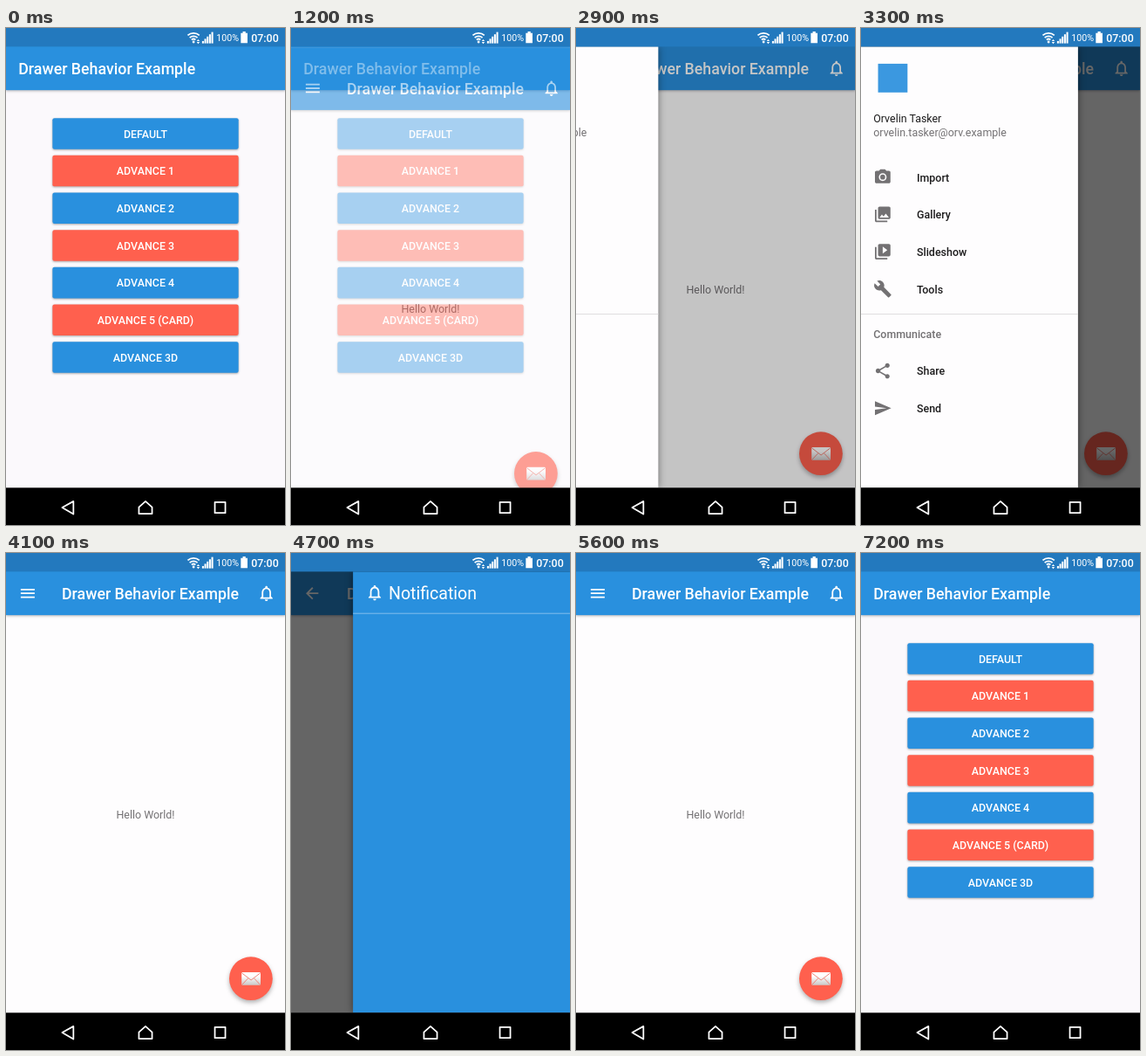
Write an HTML page that moves like this. It is 320 px wide and 569 px high and loops after 8000 ms.

```html
<!DOCTYPE html>
<html lang="en">
<head>
<meta charset="utf-8">
<title>Drawer demo</title>
<style>
  html, body { margin: 0; width: 100%; height: 100%; overflow: hidden; background: #000; }
  svg { display: block; width: 100vw; height: 100vh; }
  text { font: 14px Roboto, sans-serif; }
  .medium { font-weight: 500; }
  .title { font-size: 20px; font-weight: 500; fill: #fff; }
  .blue { fill: #2990de; }
  .red { fill: #ff604e; }
  .white { fill: #fff; }
  .grey { fill: #737173; }
  .line { fill: none; stroke: #fff; stroke-width: 2; }
  .bar { filter: drop-shadow(0 1.5px 2px rgba(0, 0, 0, .3)); }
  .button { filter: drop-shadow(0 1.3px 1.3px rgba(0, 0, 0, .35)); }
  .fab { filter: drop-shadow(0 3px 3px rgba(0, 0, 0, .3)); }
  .drawer { filter: drop-shadow(0 0 5px rgba(0, 0, 0, .45)); }
</style>
</head>
<body>
<!-- The viewBox is in dp: 360 x 640 -->
<svg viewBox="0 0 360 640" preserveAspectRatio="none">
  <defs>
    <path id="bell" d="M12 22c1.1 0 2-.9 2-2h-4c0 1.1.9 2 2 2zm6-6v-5c0-3.07-1.63-5.64-4.5-6.32V4c0-.83-.67-1.5-1.5-1.5s-1.5.67-1.5 1.5v.68C7.64 5.36 6 7.92 6 11v5l-2 2v1h16v-1l-2-2zm-2 1H8v-6c0-2.48 1.51-4.5 4-4.5s4 2.02 4 4.5v6z"/>
    <linearGradient id="paper" x2="0" y2="1">
      <stop offset=".3" stop-color="#fff"/><stop offset="1" stop-color="#c9c9c9"/>
    </linearGradient>
  </defs>

  <g id="home">
    <rect width="360" height="640" fill="#fbf9fc"/>
    <rect class="blue bar" width="360" height="80"/>
    <text class="title" x="16" y="59.5">Drawer Behavior Example</text>
    <g id="buttons"></g>
  </g>

  <g id="detail">
    <rect width="360" height="640" fill="#fefdfe"/>
    <rect class="blue bar" width="360" height="80"/>
    <path id="toggle" class="line"/>
    <text class="title" x="72" y="59.5">Drawer Behavior Example</text>
    <use href="#bell" class="white" x="324" y="40"/>
    <text x="180" y="341.5" text-anchor="middle" fill="#747274">Hello World!</text>
    <circle class="red fab" cx="316" cy="548" r="28"/>
    <rect x="304" y="540" width="24.5" height="16.5" rx="1.5" fill="url(#paper)"/>
    <path d="M304.5 541L316.2 550L328 541M304.5 556L312.5 547.5M328 556L320 547.5" fill="none" stroke="#f08377" stroke-width="1.1"/>

    <rect id="scrim" width="360" height="640"/>

    <g id="left">
      <rect class="drawer" y="24" width="280" height="568" fill="#fefdfe"/>
      <rect x="22" y="46" width="38" height="37" fill="#3b98e0"/>
      <text x="16" y="121" fill="#1d1c1d">Orvelin Tasker</text>
      <text x="16" y="140" class="grey">orvelin.tasker@orv.example</text>
      <g id="menu"></g>
      <rect y="368" width="280" height="1" fill="#dbdadb"/>
      <text class="medium grey" x="16" y="399">Communicate</text>
    </g>

    <g id="right">
      <rect class="blue drawer" x="80" y="24" width="280" height="568"/>
      <use href="#bell" class="white" x="96" y="39"/>
      <text class="white" x="126" y="59.5" style="font-size:22px">Notification</text>
      <rect x="80" y="77.3" width="280" height="1" fill="#8cc3ef"/>
    </g>
  </g>

  <g id="status" class="white">
    <rect width="360" height="24" fill="#2379be"/>
    <path class="line" d="M234.5 9.5a11 11 0 0 1 15 0M237 12.5a7.4 7.4 0 0 1 10 0M239.5 15.2a3.8 3.8 0 0 1 5 0"/>
    <circle cx="242" cy="18" r="1.6"/>
    <path d="M246 17l2-2.5 2 2.5zM246 18l2 2.5 2-2.5z"/>
    <path d="M303 6.5h2.5v-2h3.6v2h2.5v13H303z"/>
    <text x="271.5" y="17" style="font-size:12px">100%</text>
    <text class="medium" x="316.3" y="17.5">07:00</text>
  </g>

  <rect y="592" width="360" height="48"/>
  <path class="line" stroke-linejoin="round" d="M72.5 617.5L87 609.5V626zM171.5 617L180 609.5L188.5 617V625.5H171.5zM269.5 610.5h13.5v14h-13.5z"/>
</svg>

<script>
const $ = id => document.getElementById(id);
const add = (id, markup) => $(id).insertAdjacentHTML('beforeend', markup);

['DEFAULT', 'ADVANCE 1', 'ADVANCE 2', 'ADVANCE 3', 'ADVANCE 4', 'ADVANCE 5 (CARD)', 'ADVANCE 3D'].forEach((label, i) => {
  const y = 116 + 48 * i;
  add('buttons', `<rect class="button ${i % 2 ? 'red' : 'blue'}" x="60" y="${y}" width="240" height="40" rx="2.5"/>
    <text class="medium white" x="180" y="${y + 25.5}" text-anchor="middle">${label}</text>`);
});

const menu = [
  ['Import', 192, 'M9 2L7.17 4H4c-1.1 0-2 .9-2 2v12c0 1.1.9 2 2 2h16c1.1 0 2-.9 2-2V6c0-1.1-.9-2-2-2h-3.17L15 2H9zm3 15c-2.76 0-5-2.24-5-5s2.24-5 5-5 5 2.24 5 5-2.24 5-5 5zM8.8 12a3.2 3.2 0 1 0 6.4 0a3.2 3.2 0 1 0-6.4 0z'],
  ['Gallery', 240, 'M22 16V4c0-1.1-.9-2-2-2H8c-1.1 0-2 .9-2 2v12c0 1.1.9 2 2 2h12c1.1 0 2-.9 2-2zm-11-4l2.03 2.71L16 11l4 5H8l3-4zM2 6v14c0 1.1.9 2 2 2h14v-2H4V6H2z'],
  ['Slideshow', 288, 'M4 6H2v14c0 1.1.9 2 2 2h14v-2H4V6zm16-4H8c-1.1 0-2 .9-2 2v12c0 1.1.9 2 2 2h12c1.1 0 2-.9 2-2V4c0-1.1-.9-2-2-2zm-8 12.5v-9l6 4.5-6 4.5z'],
  ['Tools', 336, 'M22.7 19l-9.1-9.1c.9-2.3.4-5-1.5-6.9-2-2-5-2.4-7.4-1.3L9 6 6 9 1.6 4.7C.4 7.1.9 10.1 2.9 12.1c1.9 1.9 4.6 2.4 6.9 1.5l9.1 9.1c.4.4 1 .4 1.4 0l2.3-2.3c.5-.4.5-1.1.1-1.4z'],
  ['Share', 441.5, 'M18 16.08c-.76 0-1.44.3-1.96.77L8.91 12.7c.05-.23.09-.46.09-.7s-.04-.47-.09-.7l7.05-4.11c.54.5 1.25.81 2.04.81 1.66 0 3-1.34 3-3s-1.34-3-3-3-3 1.34-3 3c0 .24.04.47.09.7L8.04 9.81C7.5 9.31 6.79 9 6 9c-1.66 0-3 1.34-3 3s1.34 3 3 3c.79 0 1.5-.31 2.04-.81l7.12 4.16c-.05.21-.08.43-.08.65 0 1.61 1.31 2.92 2.92 2.92s2.92-1.31 2.92-2.92-1.31-2.92-2.92-2.92z'],
  ['Send', 489.5, 'M2.01 21L23 12 2.01 3 2 10l15 2-15 2z']
];
for (const [label, y, icon] of menu)
  add('menu', `<path class="grey" fill-rule="evenodd" transform="translate(16 ${y - 12})" d="${icon}"/>
    <text class="medium" x="72" y="${y + 5.5}" fill="#1d1c1d">${label}</text>`);

for (let i = 0; i < 5; i++) {
  const h = 3 + 2.9 * i;
  add('status', `<rect x="${253 + 3 * i}" y="${19.8 - h}" width="2.3" height="${h}"/>`);
}

const LOOP = 8000, STEP = 100, LEAD = 40;
const clamp = x => Math.max(0, Math.min(1, x));
const mix = (a, b, p) => a + (b - a) * p;
const easeOut = (p, power) => 1 - (1 - p) ** power;

// Progress since start; the first step is already slightly under way
const since = (t, start, duration) => t < start ? 0 : clamp((t - start + LEAD) / duration);
const settle = (t, start) => easeOut(since(t, start, 440), 5);
const drawerAt = (t, open, close) => settle(t, open) - settle(t, close);

// Hamburger at p = 0, back arrow at p = 1
function drawToggle(p) {
  const size = mix(18, 11.3, p), shaft = mix(18, 16, p), cut = 0.7 * p;
  const angle = p * Math.PI / 4, offset = mix(5, -0.7, p);
  const dx = size * Math.cos(angle), dy = size * Math.sin(angle), x = -shaft / 2;
  $('toggle').setAttribute('d', `M${x + cut} 0h${shaft - 2 * cut}M${x} ${offset}l${dx} ${dy}M${x} ${-offset}l${dx} ${-dy}`);
  $('toggle').setAttribute('transform', `translate(28 52) rotate(${180 * (p - 1)})`);
}

function draw(now) {
  const t = Math.floor(now % LOOP / STEP) * STEP;
  const left = drawerAt(t, 2900, 3700), right = drawerAt(t, 4300, 5200);
  const fadeIn = easeOut(since(t, 1200, 200), 4);
  const fadeOut = clamp((t - 6800 + LEAD - 100) / 150);
  const rise = 47 * (1 - easeOut(since(t, 1200, 350), 5));

  $('detail').setAttribute('opacity', fadeIn * (1 - fadeOut));
  $('detail').setAttribute('transform', `translate(0 ${rise})`);
  $('scrim').setAttribute('opacity', 0.6 * Math.max(left, right));
  $('left').setAttribute('transform', `translate(${-280 * (1 - left)} 0)`);
  $('right').setAttribute('transform', `translate(${280 * (1 - right)} 0)`);
  $('left').setAttribute('visibility', left > 0 ? 'visible' : 'hidden');
  $('right').setAttribute('visibility', right > 0 ? 'visible' : 'hidden');
  drawToggle(Math.max(left, right));
}

const start = performance.now();
(function tick() {
  draw(performance.now() - start);
  requestAnimationFrame(tick);
})();
</script>
</body>
</html>
```
